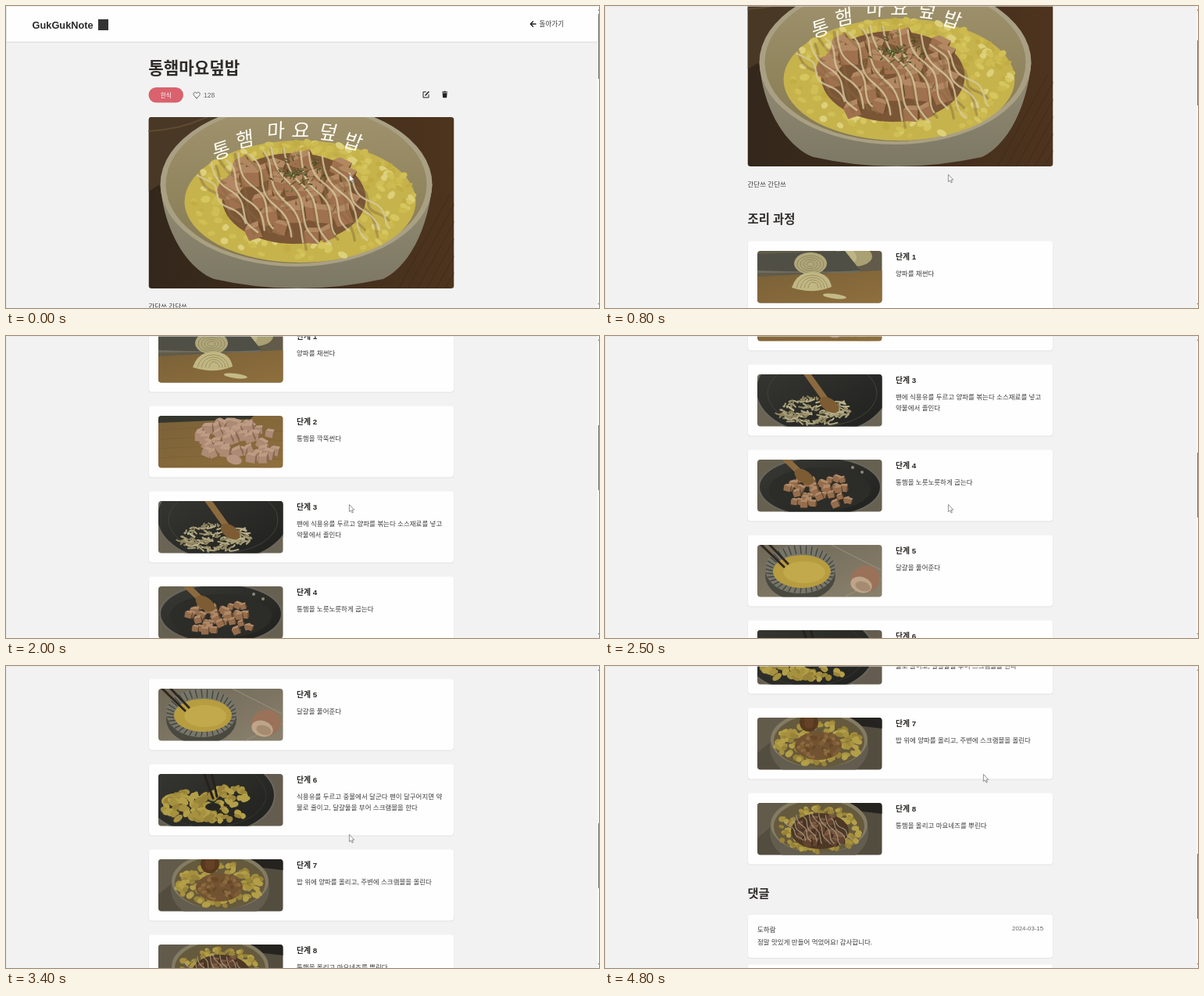
An HTML page that plays this animation: 759x386 px, repeating every 4900 ms.

```html
<!DOCTYPE html>
<html lang="ko">
<head>
<meta charset="utf-8">
<title>Recipe page</title>
<style>
html, body { margin: 0; width: 100%; height: 100%; overflow: hidden; background: #f2f2f2; }
svg { display: block; position: absolute; left: 0; top: 0; }
text { font-family: "Liberation Sans", "Noto Sans CJK KR", "Noto Sans CJK", sans-serif; white-space: pre; }
</style>
</head>
<body>
<svg id="stage" width="759" height="386" viewBox="0 0 759 386"></svg>
<script>
let seed = 7;
function rnd(a, b) {
  seed = (seed * 16807) % 2147483647;
  return a + (b - a) * seed / 2147483647;
}
const pick = list => list[Math.floor(rnd(0, list.length))];
const r1 = v => Math.round(v * 10) / 10;
const many = (n, f) => Array.from({ length: n }, (_, i) => f(i)).join('');

const rect = (x, y, w, h, fill, r = 0) =>
  `<rect x="${x}" y="${y}" width="${w}" height="${h}" rx="${r}" fill="${fill}"/>`;
const oval = (x, y, rx, ry, fill, turn = 0) =>
  `<ellipse cx="${r1(x)}" cy="${r1(y)}" rx="${r1(rx)}" ry="${r1(ry)}" fill="${fill}" transform="rotate(${r1(turn)} ${r1(x)} ${r1(y)})"/>`;
const ring = (x, y, rx, ry, color, w) =>
  `<ellipse cx="${x}" cy="${y}" rx="${rx}" ry="${ry}" fill="none" stroke="${color}" stroke-width="${w}"/>`;
const shape = (d, fill) => `<path d="${d}" fill="${fill}"/>`;
const line = (d, color, w, opacity = 1) =>
  `<path d="${d}" fill="none" stroke="${color}" stroke-width="${w}" stroke-linecap="round" stroke-linejoin="round" opacity="${opacity}"/>`;
// y is the vertical middle of the glyphs
const text = (x, y, size, str, fill = '#3c3c3c', weight = 400, anchor = 'start') =>
  `<text x="${x}" y="${r1(y + size * 0.375)}" font-size="${size}" font-weight="${weight}" fill="${fill}" text-anchor="${anchor}">${str}</text>`;

// random points inside an oval, back to front
function scatter(n, cx, cy, rx, ry) {
  const pts = [];
  for (let i = 0; i < n; i++) {
    const a = rnd(0, 6.283), d = Math.sqrt(rnd(0, 1));
    pts.push([cx + rx * d * Math.cos(a), cy + ry * d * Math.sin(a)]);
  }
  return pts.sort((p, q) => p[1] - q[1]);
}
function cubes(n, cx, cy, rx, ry, size, top, front, side) {
  return scatter(n, cx, cy, rx, ry).map(([x, y]) => {
    const s = size * rnd(0.8, 1.15);
    return `<g transform="translate(${r1(x)} ${r1(y)}) rotate(${r1(rnd(-28, 28))}) scale(${r1(s)})">` +
      shape('M-.5-.3L-.2-.6H.6L.5-.25Z', top) + shape('M-.5-.3L.5-.25V.5L-.45.45Z', front) +
      shape('M.5-.25L.6-.6L.68.2L.5.5Z', side) + '</g>';
  }).join('');
}
const blobs = (n, cx, cy, rx, ry, size, colors) =>
  scatter(n, cx, cy, rx, ry).map(([x, y]) =>
    oval(x, y, size * rnd(0.6, 1.2), size * rnd(0.45, 0.85), pick(colors), rnd(-50, 50))).join('');
// smooth wavy strands running down to the right across an oval
function drizzle(n, cx, cy, rx, ry, color, w, opacity) {
  return many(n, i => {
    const u = (i + 0.5) / n * 1.8 - 0.9, h = ry * Math.sqrt(1 - u * u);
    const ph = rnd(0, 6), amp = rx * 0.05, end = rnd(0.6, 1);
    const pts = Array.from({ length: 9 }, (_, k) => {
      const v = k / 8 * (1 + end) - 1;
      return [cx + u * rx + v * rx * 0.3 + amp * Math.sin(k * 1.2 + ph), cy + v * h + amp * 0.5 * Math.cos(k * 1.6 + ph)];
    });
    const d = pts.slice(1).map(([x, y], k) => {
      const [px, py] = pts[k];
      return `Q${r1(px)} ${r1(py)} ${r1((px + x) / 2)} ${r1((py + y) / 2)}`;
    }).join('');
    return line(`M${r1(pts[0][0])} ${r1(pts[0][1])}${d}`, color, w, opacity);
  });
}
let clips = 0;
function photo(x, y, w, h, body) {
  const id = 'c' + clips++;
  return `<g transform="translate(${x} ${y})"><clipPath id="${id}">${rect(0, 0, w, h, '#000', 4)}</clipPath>` +
    `<g clip-path="url(#${id})">${body}</g></g>`;
}
const grad = (id, dir, a, b) =>
  `<linearGradient id="${id}" ${dir}><stop stop-color="${a}"/><stop offset="1" stop-color="${b}"/></linearGradient>`;

const defs = '<defs>' +
  grad('wood', 'x2="1" y2="0"', '#33271b', '#4d341e') +
  grad('bowl', 'x2="0" y2="1"', '#948c74', '#7c7864') +
  grad('inner', 'x2="0" y2="1"', '#a0936e', '#857a52') +
  grad('board', 'x2="1" y2="1"', '#7a6138', '#8f6f3d') +
  grad('cloth', 'x2="1" y2="1"', '#6f6857', '#8a816d') +
  grad('pan', 'x2="1" y2="1"', '#393935', '#1f201d') + '</defs>';

const egg = ['#cdbb50', '#d6c65f', '#c2ad43', '#ddd07a', '#d0bf55'];
const darkEgg = ['#a6913f', '#b39f48', '#988338'];

function hero() {
  const letters = [['통', 93, 42, -18], ['햄', 123, 28, -13], ['마', 163, 17, -6], ['요', 195, 17, 0], ['덮', 230, 19, 7], ['밥', 262, 31, 14]];
  return rect(0, 0, 391, 219, 'url(#wood)') +
    shape('M0 0H110Q40 30 16 85L0 95Z', '#483825') + line('M0 18Q40 16 75 0', '#5f4b32', 2) +
    many(7, i => line(`M${320 + i * 12} 219L${385 + i * 8} ${100 + i * 8}`, '#3d2916', 1.2, 0.5)) +
    shape('M15 86C20 150 52 195 84 207Q190 231 300 207C335 190 358 140 363 86Z', 'url(#bowl)') +
    oval(189, 86, 174, 105, '#a9a084') + oval(189, 86, 167, 101, 'url(#inner)') +
    oval(194, 108, 148, 78, '#c6b34c') + blobs(330, 194, 107, 146, 76, 5.5, egg) +
    oval(186, 104, 92, 58, '#7a5536') +
    cubes(48, 186, 103, 90, 60, 21, '#b28862', '#a0714e', '#73502f') +
    drizzle(13, 192, 112, 112, 68, '#85693f', 3.4, 0.45) +
    drizzle(13, 192, 110, 112, 68, '#d8ca9f', 2.4, 0.8) +
    many(70, () => {
      const a = rnd(0, 6.3), d = rnd(0, 1), x = 190 + 38 * d * Math.cos(a), y = 72 + 24 * d * Math.sin(a);
      return line(`M${r1(x)} ${r1(y)}l${r1(rnd(-7, 7))} ${r1(rnd(-4, 4))}`, pick(['#55562c', '#6b6a3a', '#454824']), 1.4);
    }) +
    letters.map(([c, x, y, a]) => `<g transform="translate(${x} ${y}) rotate(${a}) skewX(-8)">${text(0, 0, 25, c, '#fffdf5', 400, 'middle')}</g>`).join('');
}

const pan = (cx, cy, rx, ry) => oval(cx, cy, rx + 2, ry + 2, '#6b675e') + oval(cx, cy, rx, ry, 'url(#pan)');
const spoon = (x, y, bx, by) => line(`M${x} ${y}L${bx} ${by}`, '#8a6a3e', 8) + oval(bx, by, 14, 8, '#7d5c33', 35);
const bowl = () => rect(0, 0, 160, 67, '#534d40') + shape('M0 0H55L0 45Z', '#625b4c') +
  shape('M112 0H160V14L118 9Z', '#24231f') +
  oval(79, 38, 63, 43, '#625d4e') + oval(79, 28, 62, 36, '#847b63') + oval(79, 30, 58, 34, '#655a3d');

const scenes = [
  () => rect(0, 0, 160, 67, '#625b49') + shape('M0 33L160 25V67H0Z', 'url(#board)') +
    oval(124, 7, 23, 13, '#a9a073') + oval(112, 8, 15, 11, '#bdb486') +
    shape('M0 4L112 0L132 25Q90 31 0 27Z', '#504f45') + shape('M0 25Q80 28 132 25L128 28H0Z', '#6f6c5f') +
    oval(68, 16, 21, 14, '#b0a77a') + many(4, i => ring(68, 17, 17 - i * 4, 11 - i * 2.6, '#908760', 1)) +
    shape('M44 47Q50 27 71 27Q92 28 95 46Q70 56 44 47Z', '#c1b784') +
    many(4, i => line(`M${50 + i * 5} 47Q${54 + i * 4} ${31 + i * 3} 71 ${31 + i * 3}Q${87 - i * 3} ${32 + i * 3} ${90 - i * 4} 47`, '#9d925f', 1)) +
    oval(99, 58, 15, 3, '#c3ba88', 7),
  () => rect(0, 0, 160, 67, 'url(#board)') + shape('M0 0H122L118 4L0 9Z', '#35362e') +
    many(5, i => line(`M0 ${18 + i * 12}Q80 ${12 + i * 12} 160 ${20 + i * 12}`, '#705329', 0.8, 0.4)) +
    cubes(38, 94, 30, 54, 22, 12, '#bd9c84', '#ad8a74', '#876751') +
    cubes(9, 128, 50, 27, 9, 12, '#bd9c84', '#ad8a74', '#876751') + oval(97, 56, 10, 6, '#b79580', 15),
  () => rect(0, 0, 160, 67, '#6b6454') + pan(83, 20, 84, 55) + ring(83, 24, 70, 42, '#42423c', 1) +
    many(110, () => {
      const a = rnd(0, 6.3), d = Math.sqrt(rnd(0, 1)), x = 74 + 46 * d * Math.cos(a), y = 46 + 17 * d * Math.sin(a);
      return line(`M${r1(x)} ${r1(y)}q${r1(rnd(-8, 8))} ${r1(rnd(-6, 6))} ${r1(rnd(-12, 12))} ${r1(rnd(-4, 4))}`, pick(['#a89f78', '#8f8460', '#b9b08a']), 2);
    }) + spoon(62, -3, 92, 39),
  () => rect(0, 0, 160, 67, '#666050') + pan(80, 35, 77, 37) + oval(80, 38, 65, 28, '#2c2c28') +
    cubes(40, 80, 41, 47, 19, 9, '#b08a68', '#966d4c', '#644a32') + spoon(34, -3, 60, 22) +
    many(2, i => oval(122 + i * 12, 10 + i * 6, 2, 2, '#8b877b')),
  () => rect(0, 0, 160, 67, 'url(#cloth)') + line('M95 0L160 33M110 67L160 43', '#9a917c', 1) +
    oval(55, 39, 45, 32, '#4a493f') + oval(55, 31, 45, 31, '#77766a') +
    many(36, i => {
      const a = i * Math.PI / 18, c = Math.cos(a), s = Math.sin(a);
      return line(`M${r1(55 + 44 * c)} ${r1(31 + 30 * s)}L${r1(56 + 37 * c)} ${r1(33 + 22 * s)}`, '#45443b', 1.4);
    }) + oval(57, 34, 37, 21, '#b79c40') + oval(60, 35, 27, 14, '#c2a94c') +
    line('M3 -2L34 28M14 -2L39 24', '#302820', 3) +
    oval(138, 44, 19, 17, '#997259', -20) + oval(133, 51, 14, 10, '#bea58a', 18) + oval(135, 53, 10, 6, '#a58b70', 18),
  () => rect(0, 0, 160, 67, '#645d4f') + pan(66, 27, 82, 49) + ring(66, 27, 72, 41, '#363630', 1) +
    blobs(75, 42, 40, 38, 19, 6, darkEgg) + blobs(36, 90, 28, 25, 12, 5, darkEgg) + blobs(26, 78, 52, 32, 9, 5, darkEgg) +
    oval(70, 42, 10, 5, '#262621') + line('M58 -2L70 31M68 -2L75 29', '#26211a', 3),
  () => bowl() + blobs(130, 79, 33, 54, 28, 5, darkEgg) + oval(78, 36, 30, 18, '#725331') +
    blobs(40, 78, 36, 28, 16, 3.5, ['#7f5d36', '#674827', '#8c6b41']) + oval(66, 6, 12, 12, '#56391f') + line('M66 -4L66 8', '#654125', 12),
  () => bowl() + blobs(130, 79, 34, 55, 29, 4.5, darkEgg) + oval(80, 36, 37, 23, '#4d3725') +
    cubes(26, 80, 36, 33, 20, 10, '#7b5a42', '#62442f', '#40291a') + drizzle(10, 80, 37, 40, 23, '#a89d86', 1.2, 0.85)
];
const steps = [
  ['양파를 채썬다'],
  ['통햄을 깍뚝썬다'],
  ['팬에 식용유를 두르고 양파를 볶는다 소스재료를 넣고', '약불에서 졸인다'],
  ['통햄을 노릇노릇하게 굽는다'],
  ['달걀을 풀어준다'],
  ['식용유를 두르고 중불에서 달군다 팬이 달구어지면 약', '불로 줄이고, 달걀물을 부어 스크램블을 한다'],
  ['밥 위에 양파를 올리고, 주변에 스크램블을 올린다'],
  ['통햄을 올리고 마요네즈를 뿌린다']
];
const card = (y, h) => rect(182.5, y + 1, 391, h, '#e3e3e3', 4) + rect(183, y, 390, h, '#fefefe', 4);

function step(lines, i) {
  const y = 456.5 + i * 109;
  return card(y, 91) + photo(195, y + 12.5, 159.5, 66.5, scenes[i]()) +
    text(372, y + 20, 9.8, '단계 ' + (i + 1), '#2b2926', 700) +
    lines.map((s, k) => text(372, y + 41.5 + k * 13.6, 8.5, s)).join('');
}

const icons =
  line('M678 23H671.5M674.5 19.8L671.3 23L674.5 26.2', '#222', 1.4) +
  line('M244 117.8C240.5 115 240 113.6 240 112.4C240 110 243 109.4 244.1 111.6C245.2 109.4 248.2 110 248.2 112.4C248.2 113.6 247.6 115 244 117.8Z', '#555', 0.9) +
  line('M537.5 109.8H534V117H541V113.5', '#222', 1) + line('M537 114L541 109.8', '#222', 1.6) +
  shape('M558 109.6H560L560.5 108.8H562.7L563.2 109.6H565.2V110.6H558ZM558.6 111.2H564.6L564.1 117.2H559.1Z', '#222');

const page =
  rect(0, 45, 758, 2, '#e2e2e2') + rect(0, 0, 758, 45.5, '#fefefe') +
  text(33.5, 24, 12.8, 'GukGukNote', '#2b2b2b', 700) + rect(118, 17, 13, 14, '#333') +
  text(682.5, 23, 8.6, '돌아가기') +
  text(182.3, 78.8, 21.2, '통햄마요덮밥', '#2f2c2a', 700) +
  rect(182.5, 104, 44.5, 19.5, '#d9626d', 9.75) + text(204.8, 113.8, 7.6, '한식', '#fff', 400, 'middle') +
  text(253, 113.6, 8.5, '128', '#666') + icons +
  photo(182.5, 142, 391, 219, hero()) +
  text(182.5, 384, 8.5, '간단쓰 간단쓰') +
  text(182.5, 428.4, 15.4, '조리 과정', '#2f2c2a', 700) +
  steps.map(step).join('') +
  text(182.5, 1347.2, 15.3, '댓글', '#2f2c2a', 700) +
  card(1375, 55) + text(195, 1394, 8.5, '도하람', '#333', 500) +
  text(561, 1391.6, 7.8, '2024-03-15', '#666', 400, 'end') +
  text(195, 1410, 8.5, '정말 맛있게 만들어 먹었어요! 감사합니다.') +
  card(1438.5, 55);

document.getElementById('stage').innerHTML = defs +
  rect(0, 0, 759, 386, '#f2f2f2') + `<g id="page">${page}</g>` +
  rect(0, 0, 1, 386, '#e6e6e6') + rect(0, 0, 759, 0.6, '#e6e6e6') +
  rect(757, 0, 2, 386, '#fafafa') + shape('M757.5 6L758.5 4L759 6ZM757.5 380L758.5 382L759 380Z', '#777') +
  `<g id="thumb">${rect(758, 0, 1, 83, '#777')}</g>` +
  `<g id="arrow"><path d="M.4.4V9.6L2.5 7.8L4 11L5.4 10.4L4 7.2H6.8Z" fill="#fff" stroke="#777" stroke-width=".8"/></g>`;

// [ms, value...]
const scroll = [[0, 0], [600, 0], [800, 156], [1300, 234], [1600, 350], [1700, 350], [2000, 476], [3000, 800], [3800, 952], [4100, 1057], [4900, 1057]];
const mouse = [[0, 439, 215], [4100, 439, 215], [4500, 463, 180], [4800, 484, 138], [4900, 484, 138]];

function at(track, t, col = 1) {
  const i = track.findIndex((k, n) => n && t <= k[0]);
  const a = track[i - 1], b = track[i];
  return a[col] + (b[col] - a[col]) * (t - a[0]) / (b[0] - a[0]);
}
const $ = id => document.getElementById(id);
const move = (id, x, y) => $(id).setAttribute('transform', `translate(${x} ${y})`);
const start = performance.now();

function draw() {
  const t = Math.floor((performance.now() - start) % 4900 / 100) * 100;
  const y = Math.round(at(scroll, t));
  move('page', 0, -y);
  move('thumb', 0, Math.round(10.3 + y * 0.2175));
  move('arrow', Math.round(at(mouse, t)), Math.round(at(mouse, t, 2)));
  requestAnimationFrame(draw);
}
draw();
</script>
</body>
</html>
```
